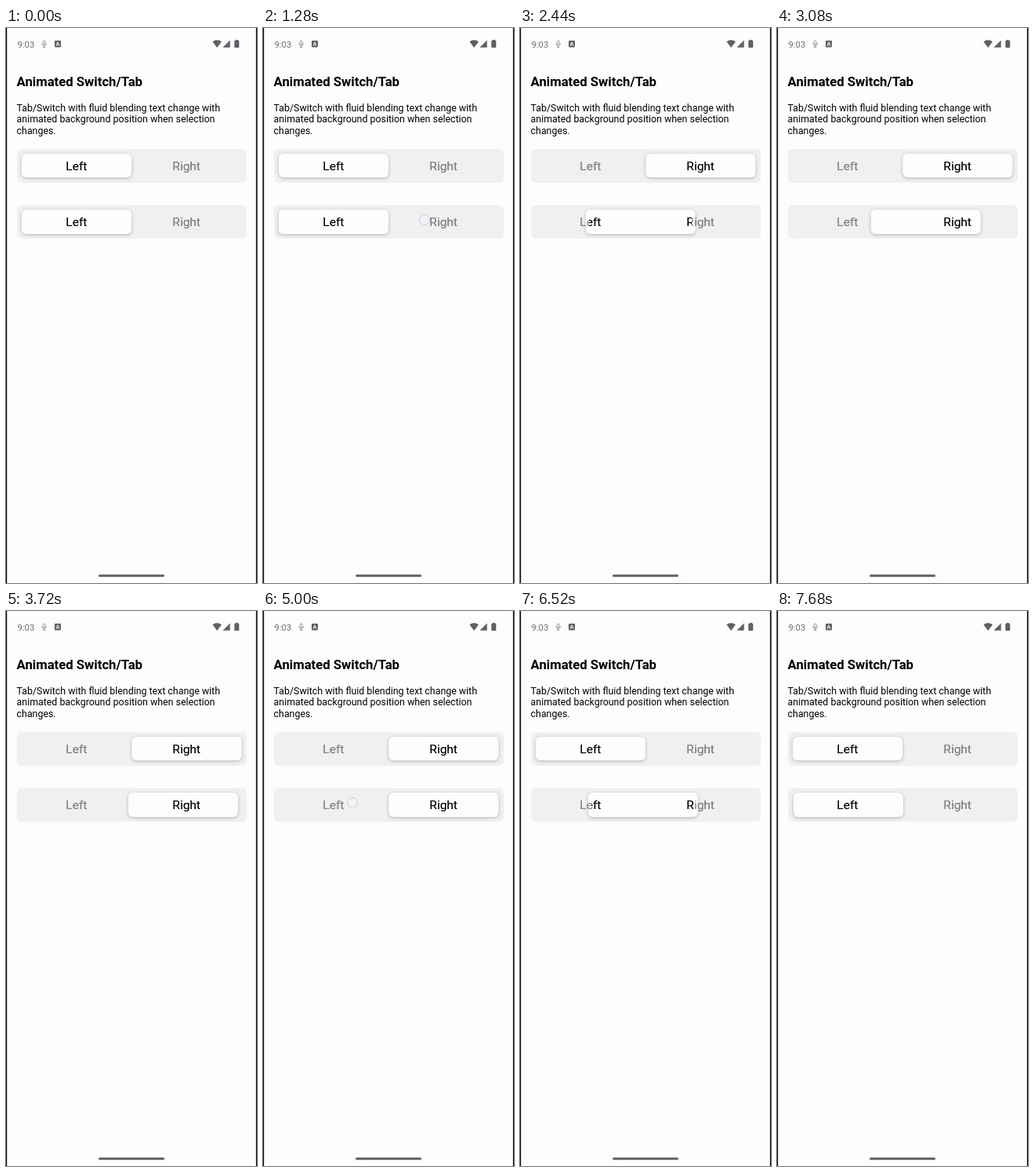
An HTML page that plays this animation: 320 by 706 pixels, repeating every 7.72 s.

```html
<!DOCTYPE html>
<html lang="en">
<head>
<meta charset="utf-8">
<title>Animated switch</title>
<style>
  @property --x { syntax: "<length>"; inherits: true; initial-value: 0px; }

  html, body { margin: 0; width: 100%; height: 100%; overflow: hidden; background: #fefcff; }
  body { position: relative; font-family: Roboto, sans-serif; }
  .page { position: absolute; left: 0; top: 0; width: 320px; height: 706px; display: block; }

  .switch {
    position: absolute; left: 13.5px; width: 293px; height: 43.2px;
    border-radius: 6px; background: #f1f0ee;
    font-size: 15.48px; line-height: 33.2px; color: #868686;
    animation: 7720ms linear infinite;
  }
  .quick { top: 153.5px; animation-name: quick; }
  .slow { top: 224.8px; animation-name: slow; }

  .thumb, .labels { position: absolute; left: 6.2px; top: 6.2px; height: 30.8px; }
  .thumb {
    width: 140.3px; border-radius: 6px; background: #fefcff;
    box-shadow: 0 1px 4px rgba(0, 0, 0, .26);
    transform: translateX(var(--x));
  }
  .labels { display: flex; width: 280.6px; }
  .labels span { width: 50%; text-align: center; }
  /* Dark copy of the labels, visible only well inside the thumb */
  .active { color: #000; clip-path: inset(0 calc(145.3px - var(--x)) 0 calc(var(--x) + 5px)); }

  @keyframes quick {
    0%, 17.02% { --x: 0px; }
    20.91%, 67.64% { --x: 140.3px; }
    71.53%, 100% { --x: 0px; }
  }
  @keyframes slow {
    0%, 17.02% { --x: 0px; }
    49.22%, 67.64% { --x: 140.3px; }
    99.74%, 100% { --x: 0px; }
  }

  .tap {
    position: absolute; top: 236.5px; width: 12px; height: 12px; border-radius: 50%;
    border: 1px solid #c3c7ef; background: rgba(246, 246, 253, .35);
    opacity: 0; animation: tap 7720ms linear infinite;
  }
  .tap.right { left: 199px; animation-delay: 1150ms; }
  .tap.left { left: 107px; animation-delay: 4990ms; }
  @keyframes tap {
    0%, 1.6% { opacity: 1; }
    3.8%, 100% { opacity: 0; }
  }
</style>
</head>
<body>
<svg class="page" viewBox="0 0 320 706">
  <path d="M0 0h1.2v706H0zM318.8 0H320v706h-1.2z"/>
  <g fill="#616064">
    <text x="14.5" y="24.5" font-size="11.3" fill="#6c6b6f">9:03</text>
    <!-- microphone -->
    <g fill="none" stroke="#77767a" stroke-width=".8">
      <rect x="47.4" y="16.2" width="2.6" height="4.6" rx="1.3"/>
      <path d="M45.8 19.4a2.9 2.9 0 0 0 5.8 0M48.7 22.3v2M46.9 24.3h3.6"/>
    </g>
    <!-- letter badge -->
    <rect x="62" y="16" width="8" height="8.6" rx="1"/>
    <path d="M64 22.6l2-4.8 2 4.8M64.7 21.2h2.6" fill="none" stroke="#fefcff" stroke-width=".9"/>
    <!-- wifi, signal, battery -->
    <path d="M263.4 17.4a8.4 8.4 0 0 1 11.4 0L269.1 25z"/>
    <path d="M285.6 15.6v9.2h-9.2z"/>
    <path d="M292.7 16h-.7q-.8 0-.8.8v7.4q0 .8.8.8h4.4q.8 0 .8-.8v-7.4q0-.8-.8-.8h-.7v-1h-3z"/>
    <rect x="118" y="695.2" width="84" height="3" rx="1.5"/>
  </g>
  <text x="13.6" y="73.8" font-size="16.7" font-weight="700">Animated Switch/Tab</text>
  <g font-size="12.38">
    <text x="13.6" y="105.6">Tab/Switch with fluid blending text change with</text>
    <text x="13.6" y="120.1">animated background position when selection</text>
    <text x="13.6" y="134.6">changes.</text>
  </g>
</svg>

<div class="switch quick">
  <div class="labels"><span>Left</span><span>Right</span></div>
  <div class="thumb"></div>
  <div class="labels" aria-hidden="true"><span>Left</span><span>Right</span></div>
  <div class="labels active" aria-hidden="true"><span>Left</span><span>Right</span></div>
</div>
<div class="switch slow">
  <div class="labels"><span>Left</span><span>Right</span></div>
  <div class="thumb"></div>
  <div class="labels" aria-hidden="true"><span>Left</span><span>Right</span></div>
  <div class="labels active" aria-hidden="true"><span>Left</span><span>Right</span></div>
</div>

<div class="tap right"></div>
<div class="tap left"></div>
</body>
</html>
```
